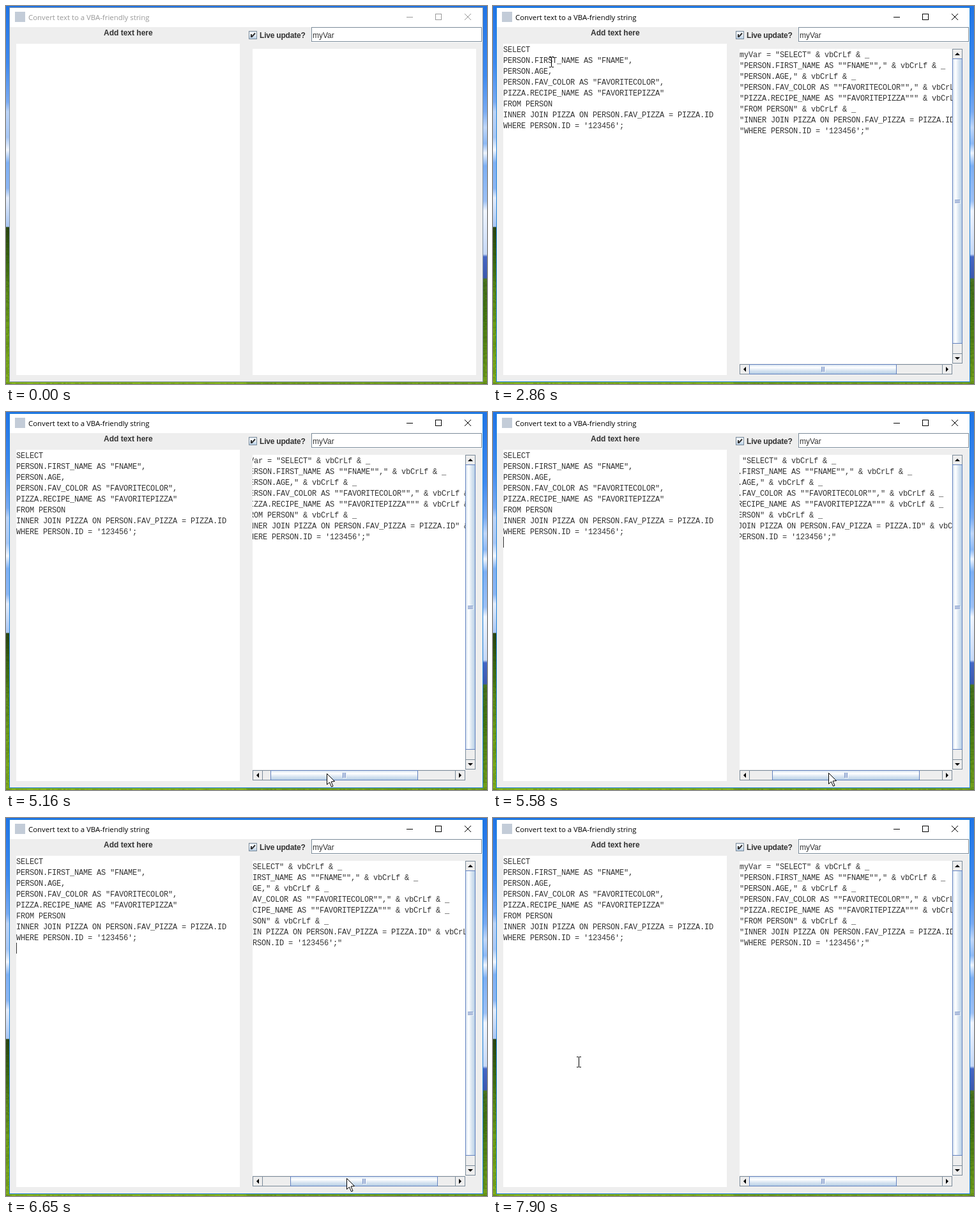
These frames come from a looping animation (753 px wide and 591 px high, 8 s). An HTML page with a canvas:

```html
<!DOCTYPE html>
<html lang="en">
<head>
<meta charset="utf-8">
<title>Text to VBA string</title>
<style>
html, body { margin: 0; width: 100%; height: 100%; overflow: hidden; }
canvas { display: block; }
</style>
</head>
<body>
<canvas id="stage" width="753" height="591"></canvas>
<script>
const ctx = document.getElementById('stage').getContext('2d');
const LOOP = 8000, ACTIVE = 1000, PASTE = 2430;
const UI = '"Liberation Sans", Arial, sans-serif';
const MONO = '12px "Liberation Mono", monospace';
const EDGE = '#7a8a99', BLUE = '#6382bf', INK = '#333';

const input = [
  'SELECT',
  'PERSON.FIRST_NAME AS "FNAME",',
  'PERSON.AGE,',
  'PERSON.FAV_COLOR AS "FAVORITECOLOR",',
  'PIZZA.RECIPE_NAME AS "FAVORITEPIZZA"',
  'FROM PERSON',
  'INNER JOIN PIZZA ON PERSON.FAV_PIZZA = PIZZA.ID',
  "WHERE PERSON.ID = '123456';"
];
const output = input.map((line, i) =>
  (i ? '' : 'myVar = ') + '"' + line.replace(/"/g, '""') + '"' +
  (i < input.length - 1 ? ' & vbCrLf & _' : ''));

// Caret switches on and off alternately at these times
const blinks = [1000, 1480, 2000, 2860, 3390, 3900, 4300, 4800, 5300, 5760, 6210, 6730, 7200, 7660];

// Pointer path: time, x, y, number of steps taken from the previous point
const path = [
  [0, -99, -99], [500, 30, 268], [740, 94, 96, 3], [820, 91, 87],
  [3580, 100, 112], [4210, 448, 543, 7], [4300, -99, -99],
  [4470, 486, 571], [4530, 489, 565], [4980, 493, 565],
  [5580, 525, 564, 7], [5760, 534, 563, 2], [5860, 536, 563],
  [6120, 537, 563], [6210, 535, 563], [6650, 533, 563],
  [7090, 510, 565, 5], [7420, 476, 566, 4], [7480, 470, 563], [7900, 134, 381, 5]
];

function pointer(t) {
  const i = path.findIndex(p => p[0] > t);
  if (i < 0) return path[path.length - 1].slice(1);
  const a = path[i - 1], b = path[i], n = b[3] || 1;
  const u = Math.floor((t - a[0]) / (b[0] - a[0]) * n + 1e-6) / n;
  return [1, 2].map(k => Math.round(a[k] + (b[k] - a[k]) * u));
}

function rect(x, y, w, h, color) {
  ctx.fillStyle = color;
  ctx.fillRect(x, y, w, h);
}

function box(x, y, w, h, edge, fill) {
  rect(x, y, w, h, edge);
  rect(x + 1, y + 1, w - 2, h - 2, fill);
}

function poly(points, fill, stroke) {
  ctx.beginPath();
  points.forEach(([x, y]) => ctx.lineTo(x, y));
  ctx.closePath();
  ctx.fillStyle = fill;
  ctx.fill();
  if (stroke) {
    ctx.lineWidth = 1;
    ctx.strokeStyle = stroke;
    ctx.stroke();
  }
}

function text(s, x, y, font, color = INK, spacing = 0) {
  ctx.font = font;
  ctx.letterSpacing = spacing + 'px';
  ctx.fillStyle = color;
  ctx.fillText(s, x, y);
}

function gradient(x0, y0, x1, y1, stops) {
  const g = ctx.createLinearGradient(x0, y0, x1, y1);
  stops.forEach(([at, color]) => g.addColorStop(at, color));
  return g;
}

const metal = (x0, y0, x1, y1) => gradient(x0, y0, x1, y1,
  [[0, '#dde8f3'], [.3, '#fff'], [.6, '#dde8f3'], [1, '#b8cfe5']]);

// Stops given by height in pixels
const landscape = stops => gradient(0, 0, 0, 591, stops.map(([y, c]) => [y / 591, c]));

const leftView = landscape([
  [0, '#1f74e6'], [90, '#3f8af0'], [150, '#79aaf2'], [165, '#bcd4f7'], [205, '#a8c8f6'],
  [225, '#f4f8fe'], [245, '#7fb0f3'], [285, '#8cb6f3'], [300, '#e6eefb'], [345, '#a9c6f3'],
  [346, '#2b4512'], [400, '#3f6c12'], [450, '#5f8f18'], [520, '#76a818'], [591, '#86b41e']]);
const rightView = landscape([
  [0, '#1f74e6'], [110, '#3f8af0'], [165, '#78aaf2'], [190, '#c0d7f8'], [215, '#8cb8f5'],
  [230, '#eef4fd'], [250, '#7caef3'], [305, '#9cc0f5'], [320, '#f0f5fd'], [388, '#c5d8f6'],
  [392, '#4566c4'], [425, '#3c58ad'], [427, '#4a7420'], [480, '#467812'], [591, '#76a41c']]);

function desktop() {
  rect(0, 0, 376, 591, leftView);
  rect(376, 0, 377, 591, rightView);
  let seed = 7;
  const random = () => (seed = seed * 16807 % 2147483647) / 2147483647;
  const blade = (x, y) => rect(x, y, 3, 2, `rgba(20,50,0,${random() * .2})`);
  for (let y = 348; y < 591; y += 2) {
    blade(0, y);
    blade(3, y);
    if (y > 428) { blade(747, y); blade(750, y); }
  }
  for (let x = 0; x < 753; x += 3) blade(x, 589);
}

function titleBar(active) {
  const color = active ? '#000' : '#999';
  box(5, 2, 742, 586, active ? '#1a7fd8' : '#7d8fa3', '#eee');
  rect(6, 3, 740, 30, '#fff');
  rect(14, 9, 16, 16, '#c3ccd8');
  text('Convert text to a VBA-friendly string', 35, 22, '11.4px "Open Sans", sans-serif', color);
  rect(627, 17, 10, 1, color);
  box(672, 12, 10, 10, color, '#fff');
  ctx.strokeStyle = color;
  ctx.lineWidth = 1;
  ctx.beginPath();
  ctx.moveTo(718, 12); ctx.lineTo(728, 22);
  ctx.moveTo(728, 12); ctx.lineTo(718, 22);
  ctx.stroke();
}

function controls() {
  text('Add text here', 153, 46, 'bold 12px ' + UI);
  box(380, 39, 13, 13, EDGE, metal(0, 40, 0, 51));
  ctx.strokeStyle = INK;
  ctx.lineWidth = 2;
  ctx.beginPath();
  ctx.moveTo(384, 44); ctx.lineTo(384, 48); ctx.lineTo(385, 48); ctx.lineTo(390, 42.5);
  ctx.stroke();
  text('Live update?', 397, 50, 'bold 12px ' + UI, INK, -.2);
  rect(478, 33, 268, 24, '#fff');
  box(478, 33, 267, 23, EDGE, '#fff');
  text('myVar', 480, 50, '12px ' + UI);
  rect(16, 59, 350, 518, '#fff');
  rect(386, 67, 350, 510, '#fff');
}

function arrowButton(x, y, dx, dy) {
  box(x, y, 16, 16, EDGE, '#eee');
  const cx = x + 8, cy = y + 8;
  poly([[cx + dx * 2, cy + dy * 2],
    [cx - dx * 2 + dy * 4, cy - dy * 2 + dx * 4],
    [cx - dx * 2 - dy * 4, cy - dy * 2 - dx * 4]], '#000');
}

function scrollBars(offset) {
  rect(719, 67, 17, 510, '#eee');
  rect(386, 559, 350, 18, '#eee');

  box(719, 67, 16, 492, EDGE, '#eee');
  arrowButton(719, 67, 0, -1);
  arrowButton(719, 543, 0, 1);
  box(719, 82, 16, 446, BLUE, metal(720, 0, 734, 0));

  box(386, 560, 333, 16, EDGE, '#eee');
  arrowButton(386, 560, -1, 0);
  arrowButton(703, 560, 1, 0);
  const x = 401 + offset;
  box(x, 560, 231, 16, BLUE, metal(0, 561, 0, 575));

  for (let i = 0; i < 3; i++) {
    rect(723, 303 + i * 2, 8, 1, BLUE);
    rect(724, 304 + i * 2, 8, 1, '#fff');
    rect(x + 113 + i * 2, 564, 1, 8, BLUE);
    rect(x + 114 + i * 2, 565, 1, 8, '#fff');
  }
}

function code(lines, x, y) {
  lines.forEach((line, i) => text(line, x, y + i * 17, MONO, INK, -.2));
}

function cursor(x, y) {
  const overText = (x > 16 && x < 366 && y > 59 && y < 577) ||
    (x > 386 && x < 719 && y > 67 && y < 559);
  if (overText) {
    rect(x, y - 7, 1, 15, '#000');
    for (const end of [y - 8, y + 8]) {
      rect(x - 3, end, 3, 1, '#000');
      rect(x + 1, end, 3, 1, '#000');
    }
  } else {
    const shape = [[0, 0], [0, 17], [4, 13.5], [7, 20.5], [9.5, 19.5], [6.5, 12.5], [12, 12]];
    poly(shape.map(([a, b]) => [x + a + .5, y + b + .5]), '#fff', '#000');
  }
}

function draw(t) {
  const [x, y] = pointer(t);
  const pasted = t >= PASTE;
  const offset = Math.max(0, Math.min(70, x - 489));
  desktop();
  titleBar(t >= ACTIVE);
  controls();
  if (pasted) {
    code(input, 16, 72);
    ctx.save();
    ctx.beginPath();
    ctx.rect(386, 67, 333, 492);
    ctx.clip();
    code(output, 386 - Math.round(offset * 101 / 70), 80);
    ctx.restore();
    scrollBars(offset);
  }
  if (blinks.filter(b => b <= t).length % 2) rect(16, pasted ? 195 : 59, 1, 17, INK);
  cursor(x, y);
}

function tick() {
  draw(performance.now() % LOOP);
  requestAnimationFrame(tick);
}
tick();
</script>
</body>
</html>
```
